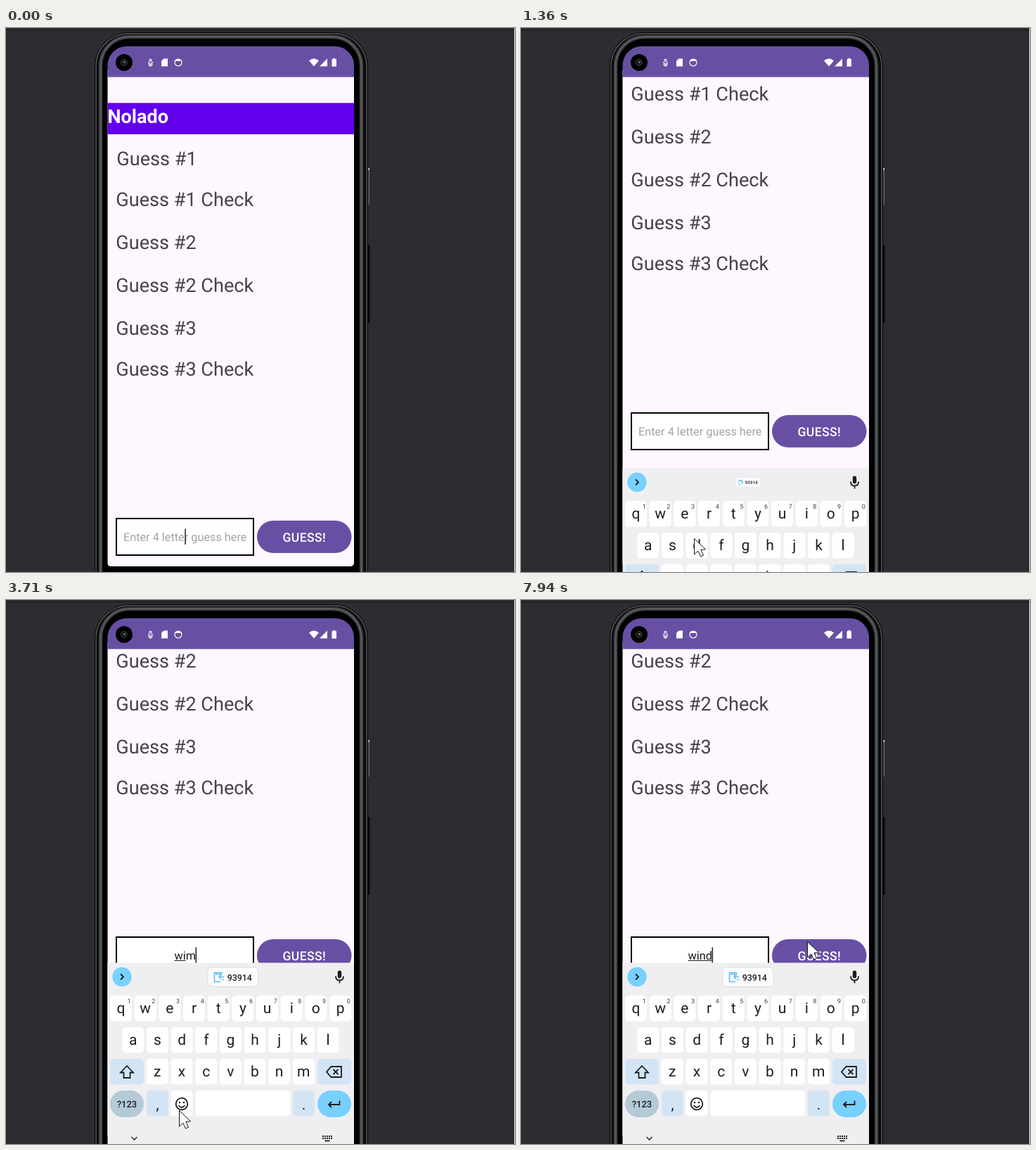
An HTML page for the animation above (8000 ms loop, 724 px wide and 773 px high).

```html
<!DOCTYPE html>
<html>
<head>
<meta charset="utf-8">
<style>
html, body { margin: 0; height: 100%; overflow: hidden; background: #2b2d30; }
svg { display: block; width: 724px; height: 773px; font-family: Roboto, sans-serif; text-rendering: geometricPrecision; }
.row { font-size: 27.1px; fill: #45424a; }
.field { font-size: 16.3px; text-anchor: middle; }
.key { font-size: 21px; text-anchor: middle; fill: #1d1e20; }
.tiny { font-size: 9px; text-anchor: middle; fill: #3c3e42; }
.line { fill: none; stroke: #1d1e20; stroke-width: 1.8; }
</style>
</head>
<body>
<svg viewBox="0 0 724 773">
  <defs>
    <clipPath id="screen"><path d="M144.5 773V53A27 27 0 0 1 171.500 26H468A27 27 0 0 1 495 53V773Z"/></clipPath>
    <clipPath id="page"><rect x="144" y="50" width="351" height="715" rx="5"/></clipPath>
  </defs>

  <!-- window and phone body -->
  <rect width="724" height="773" fill="#2b2d30"/>
  <rect y="2" width="724" height="1.5" fill="#1e1f22"/>
  <rect x="723" width="1" height="773" fill="#f2f2f2"/>
  <rect x="514" y="199" width="3" height="52" fill="#17181a"/>
  <rect x="515.5" y="199" width="1.5" height="52" fill="#6b6c6f"/>
  <rect x="515.5" y="199" width="1.5" height="3" fill="#ddd"/>
  <rect x="515" y="308" width="2.5" height="111" rx="1" fill="#08080a"/>
  <rect x="126.5" y="6.5" width="388" height="860" rx="48" fill="#0a0a0b" stroke="#050505"/>
  <rect x="128" y="8" width="385" height="860" rx="46.500" fill="none" stroke="#55575a" stroke-width="1.5"/>
  <rect x="134.500" y="12.500" width="371" height="860" rx="41" fill="#000" stroke="#2c2d2f" stroke-width="6"/>
  <rect x="134.500" y="12.500" width="371" height="860" rx="41" fill="none" stroke="#56585a" stroke-width="3"/>

  <g clip-path="url(#screen)">
    <g clip-path="url(#page)">
      <rect x="144" y="60" width="351" height="713" fill="#fef7ff"/>
      <g id="content">
        <rect x="144" y="106.5" width="351" height="44.5" fill="#6200ee"/>
        <text x="144.5" y="135" font-size="27" font-weight="700" fill="#fff">Nolado</text>
        <g id="rows"></g>
        <rect x="157" y="697" width="195" height="52" fill="#fff" stroke="#000" stroke-width="2"/>
        <text id="hint" class="field" x="254.7" y="729.3" fill="#a5a2a8">Enter 4 letter guess here</text>
        <text id="word" class="field" x="254.7" y="729.3" fill="#1d1b20"></text>
        <rect id="under" y="730" height="1" fill="#1d1b20"/>
        <rect id="caret" y="711.5" width="1.6" height="22.5" fill="#2b2833"/>
        <rect x="357" y="700" width="134.5" height="46" rx="23" fill="#6750a4"/>
        <text x="424.3" y="729.6" font-size="17.6" font-weight="500" letter-spacing=".4" text-anchor="middle" fill="#fff">GUESS!</text>
      </g>
    </g>

    <!-- status bar -->
    <rect x="144" y="26" width="351" height="43.700" fill="#6750a4"/>
    <circle cx="168" cy="49" r="12" fill="#000"/>
    <circle cx="168" cy="49" r="4.5" fill="#18191b" stroke="#3c3e40"/>
    <circle cx="168.5" cy="48.5" r="1.3" fill="#8a8c90"/>
    <g fill="none" stroke="#fff" stroke-width="1.2">
      <circle cx="205.5" cy="46" r="1.6"/>
      <path d="M202 48.5L205.5 52L209 48.5M202.5 51.5L205.5 54.5L208.5 51.5"/>
      <circle cx="245" cy="49" r="5"/>
    </g>
    <g fill="#fff">
      <path d="M224.5 43.5H230V54.5H221V47Z"/>
      <path d="M240.5 47Q245 41 249.5 47Z"/>
      <path d="M431 46.5Q438 40.5 445 46.5L438 54.5Z"/>
      <path d="M457 43.5V54.5H446Z"/>
      <path d="M465.2 43H468.2V44.3H470V54.8H463.5V44.3H465.2Z"/>
    </g>

    <g id="board">
      <rect x="144" y="515.5" width="351" height="270" fill="#efeff2"/>
      <circle cx="165" cy="535.5" r="13.7" fill="#78d0ff"/>
      <path class="line" d="M163 531.5L167 535.5L163 539.5"/>
      <g id="chip">
        <rect x="-36" y="-13.7" width="72" height="27.5" rx="6" fill="#fcfcfe" stroke="#d9dadd"/>
        <path d="M-18 7H-26.5V-6H-16.5V-2M-24 -6V-3.5H-19V-6M-13 0H-20M-17 -3L-20 0L-17 3M-13 4H-16" fill="none" stroke="#62bdf0" stroke-width="1.6"/>
        <text x="9.3" y="5" font-size="12.4" font-weight="500" text-anchor="middle" fill="#1d1e20">93914</text>
      </g>
      <rect x="471.8" y="526.5" width="5.4" height="11" rx="2.7" fill="#1d1e20"/>
      <path class="line" d="M469 534.5Q469 540.5 474.5 540.5T480 534.5M474.5 540.5V544.5"/>
      <g id="keys"></g>
      <g class="line">
        <path d="M172 662L181 671.5H176.5V679H167.5V671.5H163Z"/>
        <path d="M462.5 663H477V678H462.5L456 670.5ZM465.5 667L472.5 674M472.5 667L465.5 674"/>
        <circle cx="250" cy="716" r="8.3"/>
        <path d="M245.5 718Q250 724 254.5 718"/>
        <path d="M474.5 711.5V717H459M463 713L459 717L463 721"/>
        <path d="M178.5 763L182.5 767L186.5 763" stroke-width="1.3"/>
        <path d="M450 762H464M450 765H464" stroke-dasharray="2 1"/>
        <path d="M453.5 768.5H460.5"/>
      </g>
      <circle cx="247" cy="714" r="1.3" fill="#1d1e20"/>
      <circle cx="253" cy="714" r="1.3" fill="#1d1e20"/>
    </g>
  </g>
  <path id="pointer" d="M.5 .5V23L5.8 18L9.5 26L13.5 24.2L9.9 16.4L16.5 15.8Z" fill="#fff" stroke="#111"/>
</svg>
<script>
const $ = id => document.getElementById(id);

$('rows').innerHTML = [195, 253, 314.3, 375, 436.3, 494].map((y, i) =>
  `<text class="row" x="${i ? 156.3 : 157.3}" y="${y}">Guess #${(i >> 1) + 1}${i % 2 ? ' Check' : ''}</text>`).join('');

const PITCH = 34.67;
const cap = (x, y, w, fill = '#fff', rx = 5) =>
  `<rect x="${x}" y="${y}" width="${w}" height="${rx > 5 ? 38 : 36.5}" rx="${rx}" fill="${fill}"/>`;
const letters = (text, x0, y) => [...text].map((c, i) => {
  const x = x0 + i * PITCH;
  return cap(x - 15.5, y, 31) + `<text class="key" x="${x}" y="${y + 25}">${c}</text>`;
}).join('');

$('keys').innerHTML =
  letters('qwertyuiop', 163.5, 562) +
  [...'1234567890'].map((c, i) => `<text class="tiny" x="${175.2 + i * PITCH}" y="572.5">${c}</text>`).join('') +
  letters('asdfghjkl', 180.8, 607) +
  letters('zxcvbnm', 215.3, 652) +
  cap(148, 652, 48, '#d3e5f4') + cap(443, 652, 48, '#d3e5f4') +
  cap(148, 697, 48, '#b4cad6', 19) + cap(200, 697, 31, '#d3e5f4') +
  cap(234.5, 697, 31) + cap(269.5, 697, 134.5) +
  cap(408, 697, 31, '#d3e5f4') + cap(443, 697, 48, '#78d0ff', 19) +
  '<text class="key" style="font-size:13px;font-weight:500" x="172" y="720.5">?123</text>' +
  '<text class="key" x="215.5" y="724">,</text><text class="key" x="423.5" y="724">.</text>';

// [time, text, underlined letters]
const TYPING = [
  [0, '', 0], [3100, 'w', 0], [3170, 'w', 1], [3440, 'wi', 1], [3710, 'wim', 2],
  [3970, 'wimp', 3], [4240, 'wimp', 4], [5180, 'wim', 3], [5450, 'wi', 2],
  [6380, 'win', 2], [6640, 'wind', 3], [6910, 'wind', 4]
];
const CARET_OFF = [[330, 830], [1360, 1830], [2360, 2820], [4720, 5180], [6050, 6380], [7330, 7800]];
// keyboard entrance, one value per step
const PAN = [150, 215.5, 217.7, 218];
const DROP = [110, 29, 6, 0];
const CHIP = [.5, .69, .9, 1];

const show = (el, on) => el.setAttribute('visibility', on ? 'visible' : 'hidden');
const move = (el, x, y) => el.setAttribute('transform', `translate(${x} ${y})`);

// stepped, eased progress from 0 to 1
function progress(t, start, end, steps) {
  const k = Math.floor((t - start) / (end - start) * (steps - 1) + .001);
  const p = Math.max(0, Math.min(1, k / (steps - 1)));
  return p * p * (3 - 2 * p);
}

function draw(t) {
  const k = Math.min(3, Math.floor((t - 1360) / 70));
  const open = k >= 0;
  move($('content'), 0, open ? -PAN[k] : 0);
  show($('board'), open);
  if (open) {
    move($('board'), 0, DROP[k]);
    $('chip').setAttribute('transform', `translate(323 535.5) scale(${CHIP[k]})`);
  }

  const [, text, lined] = TYPING.filter(s => s[0] <= t).pop();
  const word = $('word');
  if (word.textContent !== text) word.textContent = text;
  show($('hint'), !text);
  const width = text ? word.getComputedTextLength() : 0;
  $('under').setAttribute('x', 254.7 - width / 2);
  $('under').setAttribute('width', lined ? word.getSubStringLength(0, lined) : 0);
  $('caret').setAttribute('x', 254.3 + width / 2);
  show($('caret'), !CARET_OFF.some(([a, b]) => t >= a && t < b));

  const a = progress(t, 470, 1160, 11), b = progress(t, 7330, 7940, 10);
  move($('pointer'), 434 - 188 * a + 161 * b, 708 + 17 * a - 240 * b);
  show($('pointer'), t >= 470);
}

function loop() {
  draw(performance.now() % 8000);
  requestAnimationFrame(loop);
}
loop();
</script>
</body>
</html>
```
